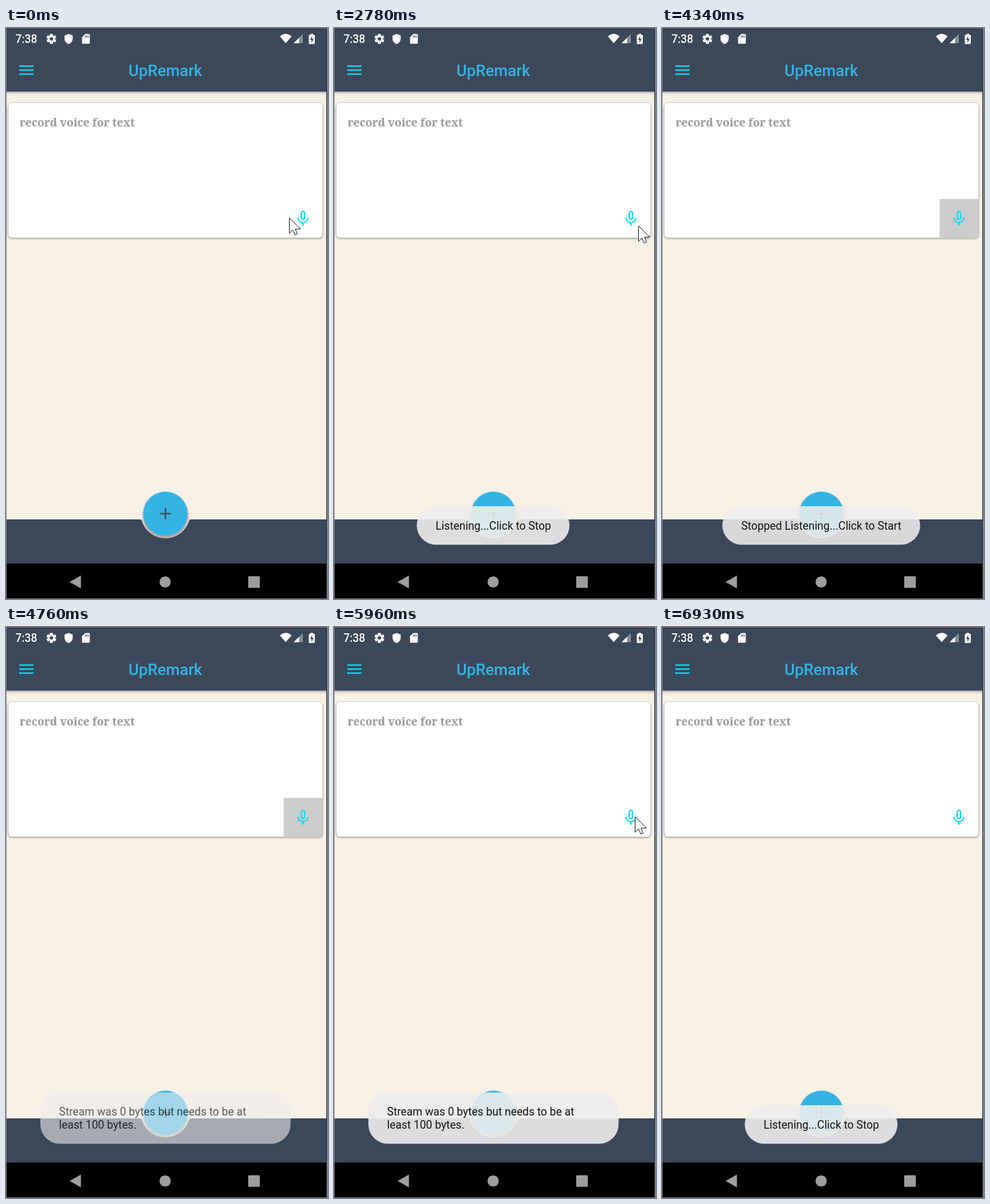
Write an HTML page that moves like this. It is 562 px wide and 997 px high and loops after 8000 ms.

```html
<!DOCTYPE html>
<html lang="en">
<head>
<meta charset="utf-8">
<title>Voice notes</title>
<style>
  html, body { margin: 0; width: 100%; height: 100%; overflow: hidden; background: #f7f0e5; }
  svg { display: block; width: 100%; height: 100%; }
  text { font-family: Roboto, sans-serif; font-size: 19.3px; }
  .medium { font-weight: 500; }
  .title { font-size: 27.6px; fill: #33b4e5; }
  .hint { font-family: "Noto Serif", serif; font-weight: 700; fill: #999; }
  .toast rect { fill: #eee; fill-opacity: .9; }
  .toast text { fill: #121212; }
</style>
</head>
<body>
<svg viewBox="0 0 562 997" xmlns="http://www.w3.org/2000/svg">
  <defs>
    <linearGradient id="barShade" x2="0" y2="1">
      <stop offset="0" stop-color="#000" stop-opacity=".3"/>
      <stop offset=".4" stop-color="#000" stop-opacity=".09"/>
      <stop offset="1" stop-color="#000" stop-opacity="0"/>
    </linearGradient>
    <filter id="soft" x="-10%" y="-10%" width="120%" height="120%">
      <feGaussianBlur stdDeviation="1.6"/>
    </filter>
    <clipPath id="cardClip"><rect x="4" y="130.5" width="548.5" height="236.5" rx="6"/></clipPath>
  </defs>

  <rect width="562" height="997" fill="#f7f0e5"/>
  <rect y="111" width="560" height="7" fill="url(#barShade)"/>
  <rect y="1" width="560" height="110" fill="#3b4859"/>

  <!-- status bar -->
  <text class="medium" x="16.5" y="26" fill="#fff">7:38</text>
  <g transform="translate(79.2 19)">
    <g id="teeth" stroke="#fff" stroke-width="5.2"></g>
    <circle r="6.2" fill="#fff"/>
    <circle r="2.9" fill="#3b4859"/>
  </g>
  <g fill="#fff">
    <path d="M109.3 10.3L116.4 13.3V18.4C116.4 22.8 113.5 26.6 109.3 28C105.1 26.6 102.2 22.8 102.2 18.4V13.3Z"/>
    <path d="M138.4 10.5H144.8Q146.3 10.5 146.3 12V26Q146.3 27.5 144.8 27.5H134.2Q132.7 27.5 132.7 26V16.2Z"/>
    <path d="M478 14.7Q488.2 6 498.5 14.7L488.2 26.6Z"/>
    <path d="M502 26.6L518 10.5V26.6Z" opacity=".38"/>
    <path d="M502 26.6L511.5 17V26.6Z"/>
    <path d="M531.3 10.3H536V12H538Q539 12 539 13V27Q539 28 538 28H529.5Q528.5 28 528.5 27V13Q528.5 12 529.5 12H531.3Z"/>
  </g>
  <path d="M138.7 13.3V16.8M141.3 13.3V16.8M143.9 13.3V16.8" stroke="#3b4859" stroke-width="1.3"/>
  <path d="M534.5 14.3L530.6 20.8H533.2V25.7L537 19H534.5Z" fill="#3b4859"/>

  <!-- app bar -->
  <path d="M23 66.5H48M23 73.5H48M23 80.5H48" stroke="#0cdcf5" stroke-width="2.6"/>
  <text class="medium title" x="278" y="84" text-anchor="middle">UpRemark</text>

  <!-- note card -->
  <rect x="3.5" y="131.5" width="549.5" height="236.5" rx="7" opacity=".36" filter="url(#soft)"/>
  <rect x="4" y="130.5" width="548.5" height="236" rx="6" fill="#fff" stroke="#000" stroke-opacity=".1"/>
  <text class="hint" x="23.7" y="171.8">record voice for text</text>
  <rect id="press" x="484.5" y="298.5" width="68.5" height="68.5" fill="#ccc" clip-path="url(#cardClip)"/>
  <path transform="translate(501.7 316.3) scale(1.38)" fill="#0cdcf5" d="M12 14c1.66 0 2.99-1.34 2.99-3L15 5c0-1.66-1.34-3-3-3S9 3.34 9 5v6c0 1.66 1.34 3 3 3zm-1.2-9.1c0-.66.54-1.2 1.2-1.2.66 0 1.2.54 1.2 1.2l-.01 6.2c0 .66-.53 1.2-1.19 1.2-.66 0-1.2-.54-1.2-1.2V4.9zm6.5 6.1c0 3-2.54 5.1-5.3 5.1S6.7 14 6.7 11H5c0 3.41 2.72 6.23 6 6.72V21h2v-3.28c3.28-.48 6-3.3 6-6.72h-1.7z"/>

  <!-- bottom bar and round button -->
  <circle cx="278.3" cy="851.5" r="40" opacity=".3" filter="url(#soft)"/>
  <path d="M0 858H234Q236.6 858 237.3 861A43 43 0 0 0 319.3 861Q320 858 322.6 858H560V935H0Z" fill="#3b4859"/>
  <circle cx="278.3" cy="848" r="38.5" fill="#33b4e5"/>
  <path d="M268.6 848H288M278.3 838.3V857.7" stroke="#3b4859" stroke-width="2.7"/>

  <!-- navigation -->
  <rect y="935" width="560" height="62"/>
  <g fill="#9e9e9e">
    <path d="M111 967.2L130.8 956V978.4Z"/>
    <circle cx="277.8" cy="967.3" r="9.8"/>
    <rect x="422.7" y="957.2" width="20.3" height="20.3" rx="1.5"/>
  </g>

  <!-- messages -->
  <g class="toast" id="listen">
    <rect x="144.4" y="834.9" width="266.6" height="67.3" rx="33.6"/>
    <text x="278" y="875.6" text-anchor="middle">Listening...Click to Stop</text>
  </g>
  <g class="toast" id="stopped">
    <rect x="105.3" y="834.9" width="345.3" height="67.3" rx="33.6"/>
    <text x="278" y="875.6" text-anchor="middle">Stopped Listening...Click to Start</text>
  </g>
  <g class="toast" id="stream">
    <rect x="60" y="812.8" width="436.6" height="89.4" rx="33.6"/>
    <text x="92.5" y="853.2">Stream was 0 bytes but needs to be at</text>
    <text x="92.5" y="875.8">least 100 bytes.</text>
  </g>

  <!-- window edge -->
  <path d="M0 1.5H560M559.5 1V996" fill="none" stroke="#1c222b"/>
  <path d="M561 0V997" stroke="#858585" stroke-width="2"/>
  <rect x=".5" y=".5" width="561" height="996" fill="none" stroke="#858585"/>

  <path id="cursor" d="M.5 .5V27.5L6.5 21.7L10.5 30.5L14.6 28.7L11 20.3L20.2 19.8Z" fill="#fff" stroke="#000"/>
</svg>
<script>
  const LOOP = 8000;
  const FRAME = 138.4; // the screen refreshes in steps of this length
  const FADE = 480;
  const el = id => document.getElementById(id);

  el("teeth").innerHTML = [0, 60, 120]
    .map(a => `<path d="M0 -8.6V8.6" transform="rotate(${a})"/>`).join("");

  // Spans in ms; the first message pops in, the rest fade
  const toasts = {
    listen: [{ from: 2760, to: 2805, fadeIn: 1 }, { from: 6020, to: Infinity }],
    stopped: [{ from: 2823, to: 4240 }],
    stream: [{ from: 4413, to: 6025 }]
  };
  // Turning points of the pointer: time, x, y
  const path = [[0, 494, 331], [260, 498, 340], [1660, 498, 340], [1799, 505, 339],
                [1937, 531, 344], [2076, 531, 345], [3330, 531, 345],
                [4840, 545, 360], [4980, 525, 331]];

  const within = (t, from, to) => t >= from && t < to;

  function smooth(x) {
    x = Math.min(1, Math.max(0, x));
    return x * x * (3 - 2 * x);
  }

  function toastOpacity(t, { from, to, fadeIn = FADE }) {
    return smooth((t - from) / fadeIn) * (1 - smooth((t - to) / FADE));
  }

  function pointerAt(t) {
    const next = path.findIndex(p => p[0] > t);
    if (next < 0) return path[path.length - 1].slice(1);
    const [t0, x0, y0] = path[next - 1], [t1, x1, y1] = path[next];
    const k = (t - t0) / (t1 - t0);
    return [x0 + (x1 - x0) * k, y0 + (y1 - y0) * k];
  }

  function show(id, on) {
    el(id).setAttribute("visibility", on ? "visible" : "hidden");
  }

  function draw(time) {
    const t = Math.floor(time / FRAME) * FRAME;
    for (const id in toasts) {
      const shown = toasts[id].map(span => toastOpacity(t, span));
      el(id).setAttribute("opacity", Math.max(...shown));
    }
    show("press", within(t, 4280, 5940));
    show("cursor", within(t, 0, 3310) || within(t, 4840, 6910));
    el("cursor").setAttribute("transform", `translate(${pointerAt(t).map(Math.round)})`);
  }

  const start = performance.now();
  function tick() {
    draw((performance.now() - start) % LOOP);
    requestAnimationFrame(tick);
  }
  tick();
</script>
</body>
</html>
```
